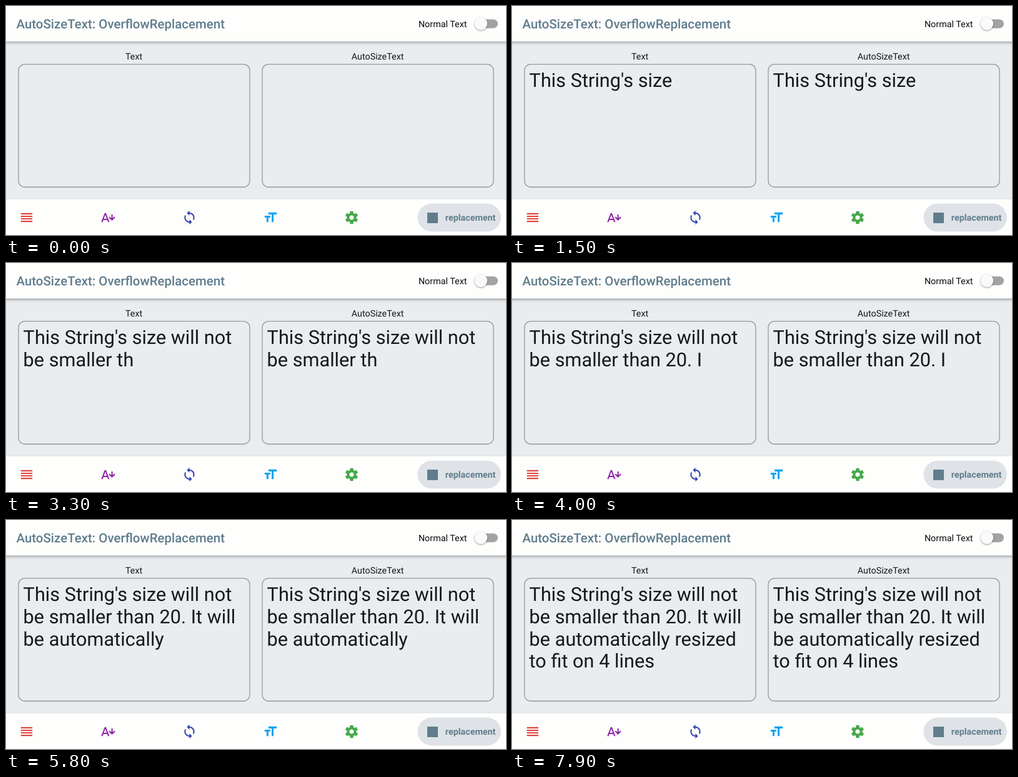
An HTML page with a canvas that plays this animation: 800 by 368 pixels, repeating every 8 s.

```html
<!DOCTYPE html>
<html lang="en">
<head>
<meta charset="utf-8">
<title>AutoSizeText: OverflowReplacement</title>
<style>
  html, body { margin: 0; width: 100%; height: 100%; overflow: hidden; background: #e9edf0; }
  canvas { display: block; }
</style>
</head>
<body>
<canvas id="stage" width="800" height="368"></canvas>
<script>
const ctx = document.getElementById('stage').getContext('2d');
const LOOP = 8000;
const CHAR_MS = 80;
const START_MS = 12;
const MESSAGE = "This String's size will not be smaller than 20. " +
  'It will be automatically resized to fit on 4 lines';
const PAPER = '#fefefd';
const SLATE = '#607d8b';

const ICONS = [
  { x: 33, color: '#de473d',
    path: 'M3 15h18v-2H3zM3 19h18v-2H3zM3 11h18V9H3zM3 5v2h18V5z' },
  { x: 163.5, color: '#8e24a6',
    path: 'M5.12 14L7.5 7.67 9.87 14M6.5 5L1 19h2.25l1.12-3h6.25l1.13 3H14L8.5 5z' +
      'M18 17l5-5.07-1.41-1.43L19 13.1V7h-2v6.1l-2.59-2.6L13 11.93z' },
  { x: 293.5, color: '#3544b0',
    path: 'M12 4V1L8 5l4 4V6c3.31 0 6 2.69 6 6 0 1.01-.25 1.97-.7 2.8l1.46 1.46' +
      'C19.54 15.03 20 13.57 20 12c0-4.42-3.58-8-8-8z' +
      'M12 18c-3.31 0-6-2.69-6-6 0-1.01.25-1.97.7-2.8L5.24 7.74' +
      'C4.46 8.97 4 10.43 4 12c0 4.42 3.58 8 8 8v3l4-4-4-4z' },
  { x: 423, color: '#0aa4ee',
    path: 'M9 4v3h5v12h3V7h5V4zM3 12h3v7h3v-7h3V9H3z' }
].map(icon => ({ ...icon, shape: new Path2D(icon.path) }));

function text(str, x, y, size, color, weight = 400, align = 'left') {
  ctx.font = `${weight} ${size}px Roboto, sans-serif`;
  ctx.textAlign = align;
  ctx.fillStyle = color;
  ctx.fillText(str, x, y);
}

function roundRect(x, y, w, h, r) {
  ctx.beginPath();
  ctx.roundRect(x, y, w, h, r);
}

function disc(x, y, r, color) {
  ctx.fillStyle = color;
  ctx.beginPath();
  ctx.arc(x, y, r, 0, Math.PI * 2);
  ctx.fill();
}

function withShadow(color, blur, dy, draw) {
  ctx.save();
  ctx.shadowColor = color;
  ctx.shadowBlur = blur;
  ctx.shadowOffsetY = dy;
  draw();
  ctx.restore();
}

function bar(y, h) {
  ctx.fillStyle = PAPER;
  ctx.fillRect(-20, y, 840, h);
}

function header() {
  withShadow('rgba(0,0,0,.38)', 5, 1.5, () => bar(-20, 77));
  text('AutoSizeText: OverflowReplacement', 16.4, 36, 20.48, '#5f7c8c', 500);
  text('Normal Text', 659.9, 34, 14.34, '#0c0c0c');
  ctx.fillStyle = '#a3a3a2';
  roundRect(753.2, 21.4, 33.8, 14.3, 7.15);
  ctx.fill();
  withShadow('rgba(0,0,0,.4)', 3, 1, () => disc(759.9, 28.5, 10.2, '#fafafa'));
}

function gear(x, y, scale, color) {
  ctx.save();
  ctx.translate(x, y);
  ctx.scale(scale, scale);
  disc(0, 0, 7.45, color);
  for (let i = 0; i < 6; i++) {
    ctx.beginPath();
    ctx.moveTo(-2.87, -6.8);
    ctx.lineTo(-2.4, -10);
    ctx.lineTo(2.4, -10);
    ctx.lineTo(2.87, -6.8);
    ctx.fill();
    ctx.rotate(Math.PI / 3);
  }
  disc(0, 0, 3.5, PAPER);
  ctx.restore();
}

function footer() {
  withShadow('rgba(0,0,0,.12)', 4, 0, () => bar(310.5, 80));
  for (const { x, color, shape } of ICONS) {
    ctx.save();
    ctx.translate(x, 340);
    ctx.scale(1.02, 1.02);
    ctx.translate(-12, -12);
    ctx.fillStyle = color;
    ctx.fill(shape, 'evenodd');
    ctx.restore();
  }
  gear(553, 340, 1.02, '#46a84b');

  ctx.fillStyle = '#dfe3e8';
  roundRect(658.5, 317.5, 133.5, 45, 22.5);
  ctx.fill();
  ctx.fillStyle = SLATE;
  ctx.fillRect(674, 332, 17, 17);
  text('replacement', 702.8, 345, 14.34, SLATE, 700);
}

function wrap(str, width) {
  const lines = [''];
  for (const word of str.split(' ')) {
    const last = lines.length - 1;
    const joined = lines[last] ? lines[last] + ' ' + word : word;
    if (ctx.measureText(joined).width > width) lines.push(word);
    else lines[last] = joined;
  }
  return lines;
}

function panel(x, label, message) {
  text(label, x + 184.6, 86, 14.34, '#16181a', 400, 'center');
  ctx.strokeStyle = '#97999b';
  ctx.lineWidth = 1.3;
  roundRect(x, 93.6, 370, 197.4, 10);
  ctx.stroke();
  ctx.font = '400 30.7px Roboto, sans-serif';
  wrap(message, 354.5).forEach((line, i) =>
    text(line, x + 7.6, Math.round(129.9 + 35.84 * i), 30.7, '#16181a'));
}

function render(t) {
  const typed = Math.max(0, Math.floor((t - START_MS) / CHAR_MS));
  const message = MESSAGE.slice(0, typed);
  ctx.textRendering = 'geometricPrecision';
  ctx.fillStyle = '#e9edf0';
  ctx.fillRect(0, 0, 800, 368);
  panel(20, 'Text', message);
  panel(410, 'AutoSizeText', message);
  header();
  footer();
}

const start = performance.now();
function tick() {
  render((performance.now() - start) % LOOP);
  requestAnimationFrame(tick);
}
tick();
</script>
</body>
</html>
```
